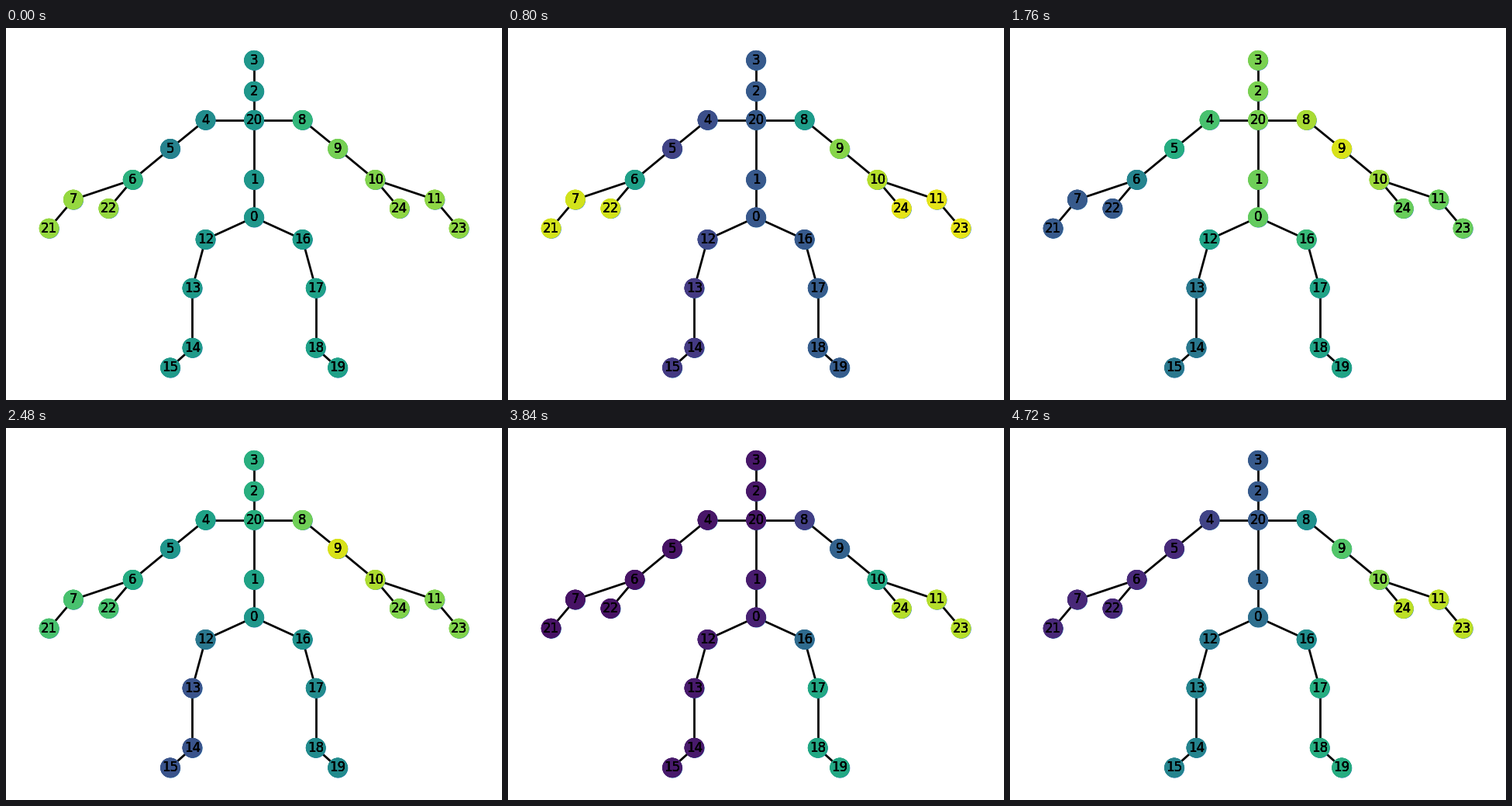
A matplotlib script for the animation above (4.8 s loop, 640 by 480 pixels).

```python
import matplotlib.pyplot as plt
import numpy as np
from matplotlib.animation import FuncAnimation

W, H, DPI = 640, 480, 100
FRAMES, INTERVAL = 60, 80
PASSES = 4  # repainting hardens the edges of discs and digits

# Skeleton on an integer grid: the spine, and one side to be mirrored
spine = {3: 0, 2: 14, 20: 27, 1: 54, 0: 71}
side = {
    (4, 8): (22, 27), (5, 9): (38, 40), (6, 10): (55, 54),
    (7, 11): (82, 63), (21, 23): (93, 76), (22, 24): (66, 67),
    (12, 16): (22, 81), (13, 17): (28, 103), (14, 18): (28, 130),
    (15, 19): (38, 139),
}
chains = [
    (3, 2, 20, 1, 0),
    (20, 4, 5, 6, 7, 21), (6, 22),
    (20, 8, 9, 10, 11, 23), (10, 24),
    (0, 12, 13, 14, 15),
    (0, 16, 17, 18, 19),
]
bones = [pair for c in chains for pair in zip(c, c[1:])]

# Percent of activity per body part at a few key times
KEYS = [0, 10, 22, 31, 38, 48, 59]
parts = {
    (2, 3, 20): [53, 28, 80, 63, 39, 6, 28],
    (0,): [53, 27, 76, 53, 38, 9, 36],
    (5,): [44, 20, 62, 52, 22, 5, 12],
    (7, 21, 22): [84, 93, 28, 71, 61, 5, 11],
    (9,): [79, 82, 94, 94, 73, 31, 73],
    (11, 23, 24): [83, 96, 77, 81, 80, 89, 90],
    (13, 14, 15): [54, 17, 40, 26, 22, 7, 45],
    (17, 18, 19): [57, 29, 58, 48, 62, 60, 62],
}


def place(x, y):
    """Grid to pixels, leaving a doubled 5% margin around the body."""
    span = 1.1 ** 2
    return W / 2 + x / 186 * W / span, H / 2 + (y / 139 - 0.5) * H / span


def activity(frame):
    """Value from 0 to 1 per joint; joints between parts blend them."""
    known = {j: np.interp(frame, KEYS, level) / 100
             for part, level in parts.items() for j in part}
    values = dict(known)
    for j in range(25):
        if j not in known:
            linked = [b if a == j else a for a, b in bones if j in (a, b)]
            # the thumbs hang off the wrist and do not feed back into it
            values[j] = np.mean([known[k] for k in linked
                                 if k in known and k not in (22, 24)])
    return [values[j] for j in range(25)]


pos = {j: place(0, y) for j, y in spine.items()}
for (left, right), (x, y) in side.items():
    pos[left], pos[right] = place(-x, y), place(x, y)
points = np.array([pos[j] for j in range(25)])

fig = plt.figure(figsize=(W / DPI, H / DPI), dpi=DPI, facecolor="white")
ax = fig.add_axes([0, 0, 1, 1])
ax.set_xlim(0, W)
ax.set_ylim(H, 0)
ax.axis("off")


def draw_discs(shift, zorder):
    return ax.scatter(*(points + shift).T, s=300, c=["#1f78b4"] * 25,
                      linewidths=1, zorder=zorder)


for a, b in bones:
    ax.plot(*zip(pos[a], pos[b]), color="black", lw=2,
            solid_capstyle="butt", zorder=1)

# Blue discs peek out at the lower right of the coloured ones
draw_discs(0.5, 2)
layers = [draw_discs(0, 3) for _ in range(PASSES)]

for j, (x, y) in pos.items():
    for _ in range(PASSES):
        ax.text(x, y, str(j), size=12, family="DejaVu Sans", color="black",
                ha="center", va="center", zorder=4)


def update(frame):
    colors = plt.cm.viridis(activity(frame))
    for discs in layers:
        discs.set_color(colors)
    return layers


anim = FuncAnimation(fig, update, frames=FRAMES, interval=INTERVAL,
                     repeat=True, repeat_delay=0)
plt.show()
```
